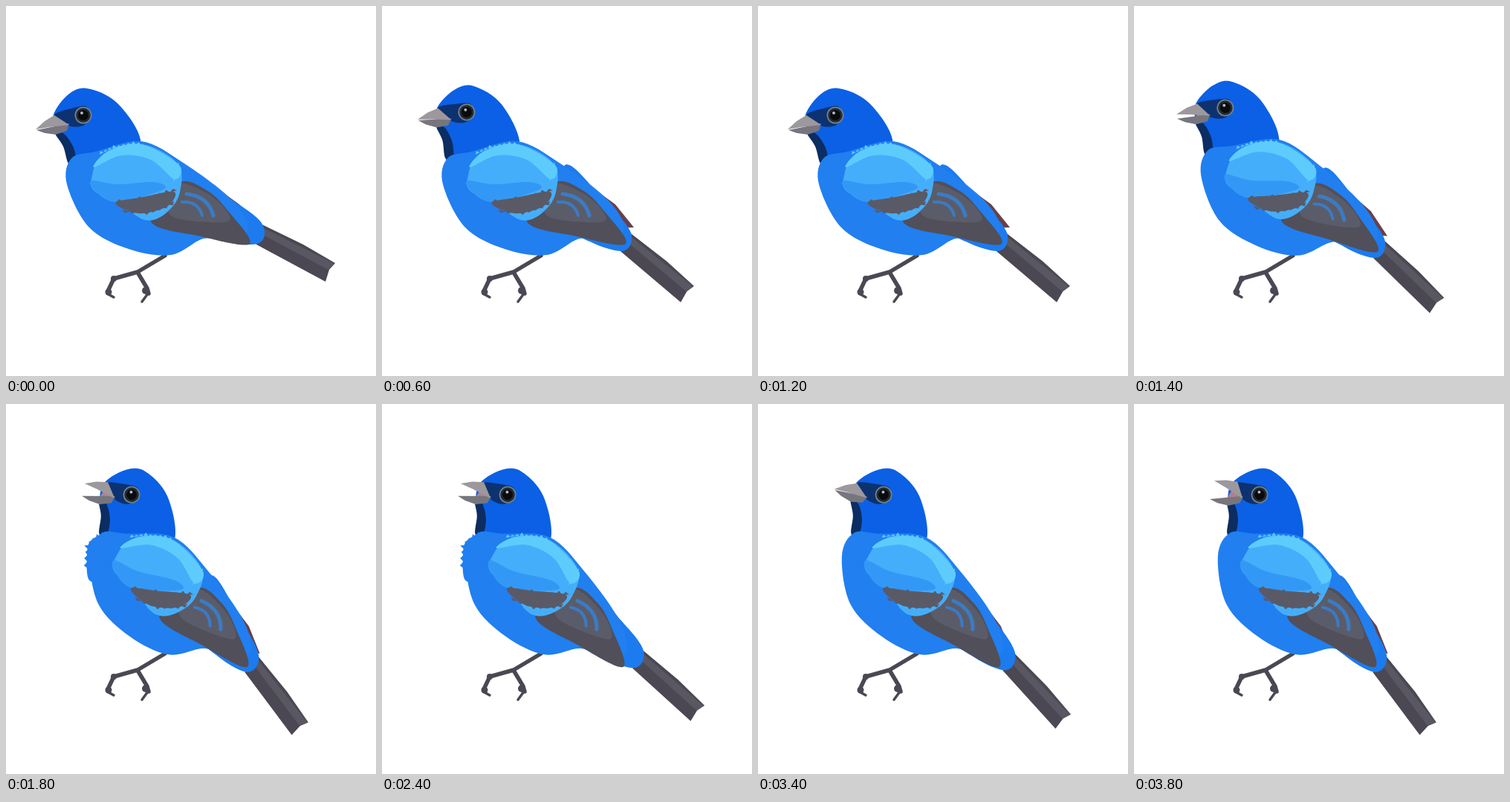
Recreate the animation shown at these times as an HTML page with a canvas. Size 498 px wide and 498 px high, loop 4 s.

```html
<!DOCTYPE html>
<html lang="en">
<head>
<meta charset="utf-8">
<title>Blue bird</title>
<style>
html, body { margin: 0; width: 100%; height: 100%; overflow: hidden; background: #fff; }
canvas { display: block; width: 498px; height: 498px; }
</style>
</head>
<body>
<canvas id="stage" width="498" height="498"></canvas>
<script>
const ctx = document.getElementById('stage').getContext('2d');
const STEP = 200, STEPS = 20;
const DARK = '#4b4853', BLUE = '#217ff0';

// Joints: the body turns on the leg, head and tail turn on the body.
const HIP = [213, 326], NECK = [138, 216], RUMP = [284, 252], JAW = [82, 161];

const ramp = x => Math.min(1, Math.max(0, x));
const smooth = x => ramp(x) ** 2 * (3 - 2 * ramp(x));
const noise = i => Math.abs(Math.sin(i * 12.9898) * 43758.5453) % 1;

// Look up, drop the tail, rise, then sing with one flick of the tail.
function pose(i) {
  const lift = smooth((i - 6) / 2.73);
  const peek = i < 6 ? smooth((i - 1) / 2) : 0;
  return {
    body: 17 * lift,
    head: 8 * peek + 6 * lift,
    tail: i < 12 ? 12 * ramp(i / 1.5) - 4 * lift : 11 * ramp((i - 16) / 2) - 3,
    mouth: i < 17 ? 0.65 * lift * smooth((17 - i) / 3) : smooth((i - 17) / 2),
    ruffled: i > 8 && i < 16
  };
}

function turned([x, y], deg, draw) {
  ctx.save();
  ctx.translate(x, y);
  ctx.rotate(deg * Math.PI / 180);
  ctx.translate(-x, -y);
  draw();
  ctx.restore();
}

function trace(p) {
  ctx.beginPath();
  for (let i = 0; i < p.length; i += 2) ctx.lineTo(p[i], p[i + 1]);
}

function poly(color, ...p) {
  trace(p);
  ctx.fillStyle = color;
  ctx.fill();
}

function line(color, width, ...p) {
  trace(p);
  ctx.strokeStyle = color;
  ctx.lineWidth = width;
  ctx.lineCap = ctx.lineJoin = 'round';
  ctx.stroke();
}

// Closed Catmull-Rom curve through a few points.
function blob(color, ...p) {
  const n = p.length;
  const at = (i, k) => p[(i * 2 + k + n) % n];
  const slope = (i, k) => (at(i + 1, k) - at(i - 1, k)) / 6;
  ctx.beginPath();
  ctx.moveTo(p[0], p[1]);
  for (let i = 0; i < n / 2; i++) {
    const a = k => at(i, k) + slope(i, k);
    const b = k => at(i + 1, k) - slope(i + 1, k);
    ctx.bezierCurveTo(a(0), a(1), b(0), b(1), at(i + 1, 0), at(i + 1, 1));
  }
  ctx.fillStyle = color;
  ctx.fill();
}

// Feather tips along a quadratic curve; a positive size points left of travel.
function fringe(color, n, size, a, c, b) {
  for (let i = 0; i < n; i++) {
    const t = (i + 0.5) / n, u = 1 - t;
    const [x, y] = [0, 1].map(k => u * u * a[k] + 2 * u * t * c[k] + t * t * b[k]);
    const [dx, dy] = [0, 1].map(k => (u * (c[k] - a[k]) + t * (b[k] - c[k])) / n);
    const s = size * (0.6 + 0.7 * noise(i + n)) / Math.hypot(dx, dy);
    poly(color, x - dx, y - dy, x + dx, y + dy, x + dy * s, y - dx * s);
  }
}

function arc(color, width, a, c, b) {
  ctx.beginPath();
  ctx.moveTo(...a);
  ctx.quadraticCurveTo(...c, ...b);
  ctx.strokeStyle = color;
  ctx.lineWidth = width;
  ctx.stroke();
}

function disc(color, x, y, r) {
  ctx.beginPath();
  ctx.arc(x, y, r, 0, 7);
  ctx.fillStyle = color;
  ctx.fill();
}

function leg() {
  line(DARK, 5.5, 214, 336, 177, 358, 145, 367, 137, 384);
  line(DARK, 3.5, 136, 387, 145, 392);
  line(DARK, 5.5, 178, 360, 190, 380, 192, 387);
  line(DARK, 3.5, 191, 387, 183, 398);
  disc(DARK, 145, 367, 4);
  disc(DARK, 138, 385, 4.5);
  disc(DARK, 188, 383, 5);
}

function farWing() {
  poly('#694049', 285, 246, 314, 267, 339, 298, 318, 299);
}

function tail() {
  poly(DARK, 332, 288, 400, 321, 443, 346, 435, 355, 430, 371, 337, 321);
  poly('#595862', 341, 296, 442, 347, 434, 355, 340, 305);
  blob('#1c7bef', 240, 222, 300, 258, 344, 292, 341, 319, 295, 317, 245, 295);
}

function beak(open) {
  if (open) poly('#b47f8c', 83, 160, 68, 160 - open * 7, 65, 168 + open * 2, 76, 169);
  turned(JAW, -17 * open, () => poly('#77757e', 41, 167, 85, 158, 82, 168, 67, 173, 52, 171));
  turned(JAW, 17 * open, () => poly('#9d989d', 40, 166, 52, 155, 65, 147, 85, 160, 58, 163));
}

function head(open) {
  blob('#0b60e5', 64, 146, 84, 119, 109, 111, 149, 130, 181, 180, 165, 225, 98, 224, 79, 190, 67, 170);
  blob('#0c2d61', 66, 171, 78, 172, 91, 191, 95, 216, 84, 212, 77, 189);
  blob('#0d3270', 65, 147, 88, 138, 109, 136, 108, 158, 87, 162);
  beak(open);
  disc('#75828c', 104, 147, 11.5);
  disc('#242c33', 104, 147, 9.8);
  disc('#0a0b0d', 104, 147, 7);
  disc('#aeb9c0', 102, 144, 2);
}

function torso() {
  blob(BLUE, 88, 205, 120, 196, 182, 182, 240, 212, 303, 260, 326, 299, 300, 317, 266, 313, 222, 335, 165, 327, 112, 298, 82, 240);
}

function wing() {
  blob('#514f59', 232, 238, 270, 248, 299, 276, 328, 320, 262, 310, 195, 290);
  blob('#5b5c69', 232, 240, 270, 252, 297, 276, 294, 291, 222, 282);
  for (let k = 0; k < 2; k++) {
    arc('#3b7bc4', 5 - k, [243 - 6 * k, 253 + 11 * k], [272 - 14 * k, 256 + 6 * k], [279 - 15 * k, 282]);
  }

  blob('#45aefb', 115, 233, 130, 201, 182, 186, 231, 212, 234, 250, 215, 279, 187, 288, 150, 264, 120, 250);
  fringe('#45aefb', 9, 4, [187, 288], [236, 278], [235, 238]);
  blob('#3398f5', 115, 235, 150, 240, 200, 237, 212, 247, 150, 264, 121, 250);
  blob('#5dccfd', 118, 217, 138, 195, 182, 186, 233, 214, 227, 233, 195, 207, 155, 201);
  fringe('#5dccfd', 9, 4, [126, 200], [150, 186], [182, 187]);
  fringe('#5dccfd', 4, 3, [225, 236], [236, 226], [232, 210]);
  blob('#5a5a67', 148, 264, 180, 258, 226, 250, 218, 269, 185, 279, 160, 274);
  fringe('#5a5a67', 9, 4, [148, 264], [190, 262], [230, 248]);
  fringe('#5a5a67', 8, 4, [226, 262], [196, 284], [156, 274]);
}

function ruffle() {
  blob(BLUE, 142, 176, 115, 183, 109, 204, 113, 238, 142, 230);
  fringe(BLUE, 8, -6, [134, 178], [104, 180], [111, 222]);
}

function draw({ body, head: nod, tail: drop, mouth, ruffled }) {
  ctx.fillStyle = '#fff';
  ctx.fillRect(0, 0, 498, 498);
  leg();
  turned(HIP, body, () => {
    farWing();
    turned(RUMP, drop, tail);
    turned(NECK, nod, () => head(mouth));
    torso();
  });
  if (ruffled) ruffle();
  turned(HIP, body, wing);
}

function tick() {
  draw(pose(Math.floor(performance.now() / STEP) % STEPS));
  requestAnimationFrame(tick);
}
tick();
</script>
</body>
</html>
```
